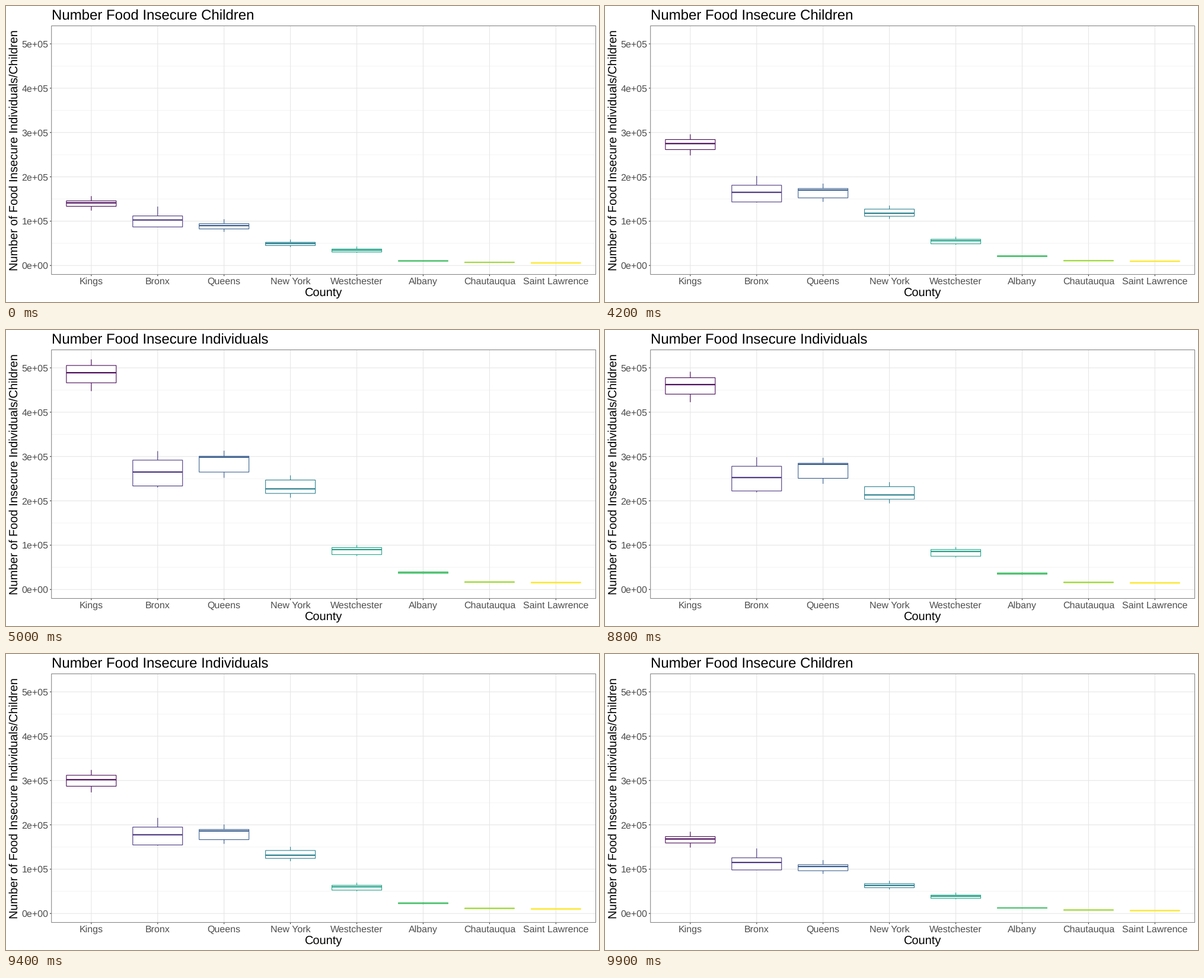
A matplotlib script for the animation above (10000 ms loop, 1000 px wide and 500 px high).

```python
import matplotlib.pyplot as plt
import numpy as np
from matplotlib.animation import FuncAnimation
from matplotlib.patches import Rectangle

W, H, DPI = 1000, 500, 100
PX = 72 / DPI  # points per pixel
LEFT, RIGHT, TOP, BOTTOM = 76.7, 994.5, 33.5, 453.5
ZERO_Y, PX_PER_THOUSAND = 438.3, 0.7487
HOLD, STEPS, FRAMES = 38, 13, 100
TITLE_SWITCH = 8
LINE, THIN, THICK = 1.07, 0.55, 2.13

# County: median of children and of individuals (thousands),
# box height relative to the median, place of the median in the box
COUNTIES = {
    "Kings": (141.3, 489, 0.080, 0.58),
    "Bronx": (102.6, 265, 0.220, 0.54),
    "Queens": (89.9, 298.5, 0.120, 0.94),
    "New York": (49.6, 227, 0.133, 0.34),
    "Westchester": (34.5, 90, 0.177, 0.71),
    "Albany": (10.4, 38.2, 0.09, 0.55),
    "Chautauqua": (7.1, 16.8, 0.07, 0.55),
    "Saint Lawrence": (5.7, 15.6, 0.06, 0.55),
}
COLORS = plt.get_cmap("viridis")(np.linspace(0, 1, len(COUNTIES)))
SLOT = (RIGHT - LEFT) / (len(COUNTIES) + 0.2)
HALF_BOX = 0.375 * SLOT

plt.rcParams.update({"font.family": "Liberation Sans",
                     "text.hinting": "none", "path.snap": False})

fig = plt.figure(figsize=(W / DPI, H / DPI), dpi=DPI, facecolor="white")
ax = fig.add_axes([0, 0, 1, 1])
ax.set_xlim(0, W)
ax.set_ylim(H, 0)
ax.axis("off")


def five_numbers(median, spread, place, reach_up, reach_down):
    """Upper whisker, Q3, median, Q1, lower whisker."""
    height = median * spread
    q1 = median - height * place
    q3 = q1 + height
    # Wide boxes leave little room for the lower whisker.
    tail = reach_down * (0.72 - 3 * spread)
    return [q3 + height * reach_up, q3, median, q1, q1 - height * tail]


CHILDREN = np.array([five_numbers(c, 1.1 * spread, 0.63, 0.85, 1.7)
                     for c, _, spread, _ in COUNTIES.values()])
INDIVIDUALS = np.array([five_numbers(p, spread, place, 0.35, 1)
                        for _, p, spread, place in COUNTIES.values()])


def x_pos(i):
    return LEFT + SLOT * (i + 0.6)


def y_pos(thousands):
    return ZERO_Y - PX_PER_THOUSAND * thousands


def line(xs, ys, color, width=LINE, z=1):
    return ax.plot(xs, ys, color=color, lw=width * PX, zorder=z,
                   solid_capstyle="butt")[0]


def label(x, y, text, size, color="black", **kw):
    return ax.text(x, y, text, fontsize=size * PX, color=color,
                   va="baseline", **kw)


def draw_panel():
    for k in range(50, 500, 100):
        line([LEFT, RIGHT], [y_pos(k)] * 2, "#ebebeb", THIN)
    for k in range(0, 501, 100):
        y = y_pos(k)
        line([LEFT, RIGHT], [y, y], "#e6e6e6")
        line([LEFT - 2.75, LEFT], [y, y], "#333333")
        label(71.5, y + 5.9, f"{k // 100}e+0{5 if k else 0}", 16,
              "#4d4d4d", ha="right")
    for i, county in enumerate(COUNTIES):
        x = x_pos(i)
        line([x, x], [TOP, BOTTOM], "#e6e6e6")
        line([x, x], [BOTTOM, BOTTOM + 2.75], "#333333")
        label(x, 470, county, 16, "#4d4d4d", ha="center")
    ax.add_patch(Rectangle((LEFT, TOP), RIGHT - LEFT, BOTTOM - TOP,
                           fill=False, ec="#858585", lw=LINE * PX, zorder=6))
    label((LEFT + RIGHT) / 2, 491, "County", 20, ha="center")
    label(19.5, (TOP + BOTTOM) / 2,
          "Number of Food Insecure Individuals/Children", 20,
          ha="center", rotation=90, rotation_mode="anchor")


class Box:
    def __init__(self, i, color):
        self.x = x_pos(i)
        self.upper = line([], [], color, z=3)
        self.lower = line([], [], color, z=3)
        self.body = ax.add_patch(Rectangle(
            (self.x - HALF_BOX, 0), 2 * HALF_BOX, 0, fc="white", ec=color,
            lw=LINE * PX, joinstyle="miter", zorder=4))
        self.median = line([], [], color, THICK, z=5)

    def place(self, stats):
        high, q3, mid, q1, low = y_pos(stats)
        self.upper.set_data([self.x] * 2, [high, q3])
        self.lower.set_data([self.x] * 2, [q1, low])
        self.body.set_y(q3)
        self.body.set_height(q1 - q3)
        self.median.set_data([self.x - HALF_BOX, self.x + HALF_BOX], [mid] * 2)


draw_panel()
title = label(LEFT, 23, "", 24)
boxes = [Box(i, color) for i, color in enumerate(COLORS)]


def update(frame):
    second_half, n = divmod(frame, FRAMES // 2)
    # Each half rests first, then moves linearly to the other group.
    step = max(0, n - HOLD + 1)
    groups = [(CHILDREN, "Children"), (INDIVIDUALS, "Individuals")]
    if second_half:
        groups.reverse()
    (start, _), (end, _) = groups
    stats = start + (end - start) * step / STEPS
    for box, row in zip(boxes, stats):
        box.place(row)
    title.set_text("Number Food Insecure " + groups[step >= TITLE_SWITCH][1])
    return []


anim = FuncAnimation(fig, update, frames=FRAMES, interval=100,
                     repeat=True, repeat_delay=0, blit=False)
plt.show()
```
